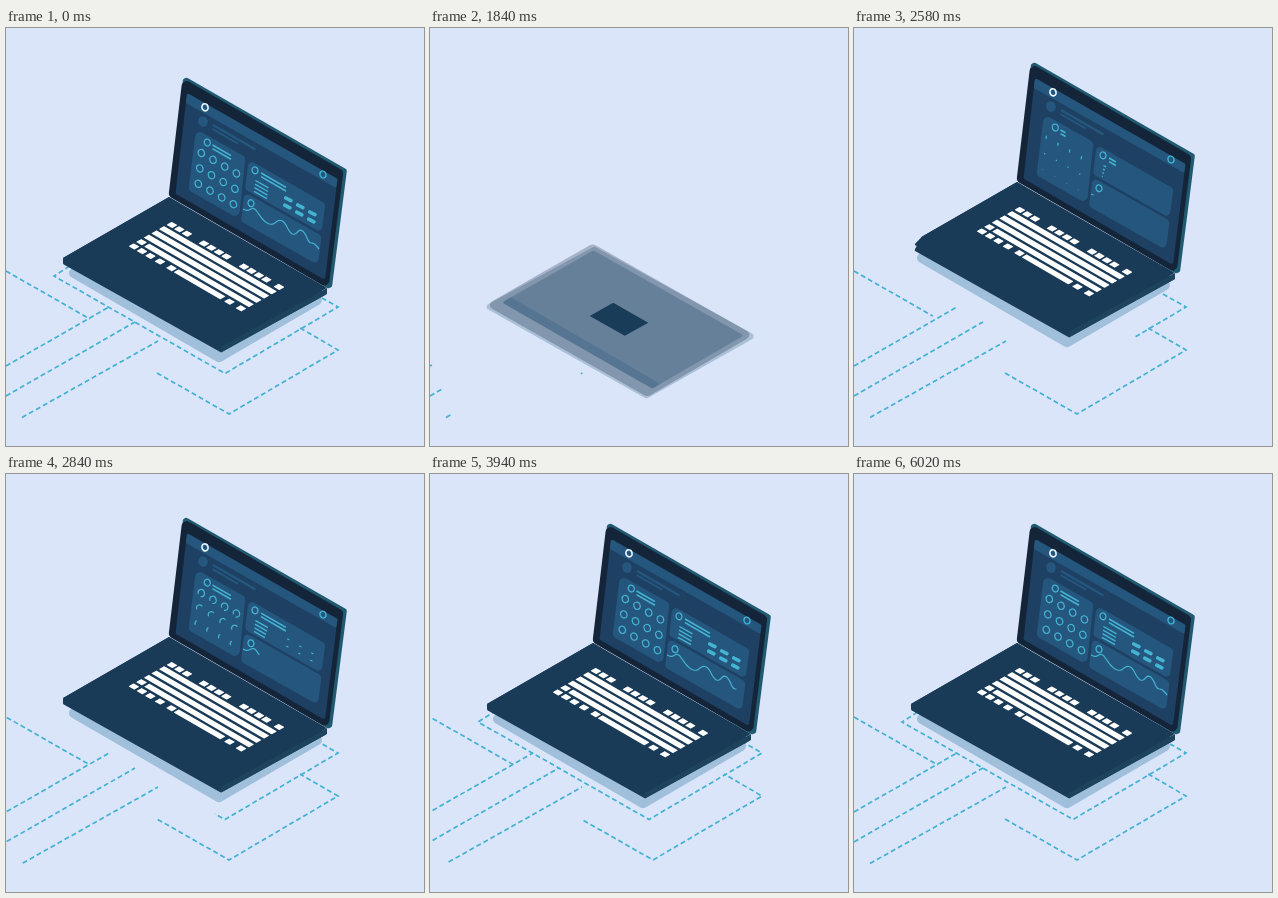
An HTML page with a canvas that plays this animation: 418x418 px, repeating every 6060 ms.

```html
<!DOCTYPE html>
<html lang="en">
<head>
<meta charset="utf-8">
<title>Laptop</title>
<style>
html, body { margin: 0; width: 100%; height: 100%; overflow: hidden; background: #dae5fa; }
canvas { display: block; width: 100vw; height: 100vh; }
</style>
</head>
<body>
<canvas id="stage"></canvas>
<script>
const SIZE = 418, LOOP = 6060;
const OUT_START = 1200, OUT_END = 1640, IN_START = 1660, IN_END = 4820;
const C = {
  back: '#dae5fa', line: '#42b1d2', cyan: '#45b4d3', shadow: '#9fbfdb',
  base: '#1a3b57', side: '#1d435d', bezel: '#14253a', edge: '#205a70',
  screen: '#1d4063', card: '#25567d'
};
const canvas = document.getElementById('stage');
const ctx = canvas.getContext('2d');

const part = (t, a, b) => Math.min(1, Math.max(0, (t - a) / (b - a)));
const smooth = p => (1 - Math.cos(Math.PI * p)) / 2;
const ease = (t, a, b) => smooth(part(t, a, b));
const mix = (a, b, p) => a + (b - a) * p;

function poly(points, fill, r = 0) {
  const n = points.length, [lx, ly] = points[n - 1], [fx, fy] = points[0];
  ctx.beginPath();
  ctx.moveTo((lx + fx) / 2, (ly + fy) / 2);
  points.forEach(([x, y], i) => {
    const [nx, ny] = points[(i + 1) % n];
    ctx.arcTo(x, y, nx, ny, r);
  });
  ctx.closePath();
  ctx.fillStyle = fill;
  ctx.fill();
}

function strokeStyle(color, width, cap = 'butt') {
  ctx.strokeStyle = color;
  ctx.lineWidth = width;
  ctx.lineCap = cap;
}

function seg(x1, y1, x2, y2, color, width, p = 1) {
  if (p <= 0) return;
  strokeStyle(color, width);
  ctx.beginPath();
  ctx.moveTo(x1, y1);
  ctx.lineTo(mix(x1, x2, p), mix(y1, y2, p));
  ctx.stroke();
}

function ring(x, y, r, color, width, p = 1) {
  if (p <= 0) return;
  strokeStyle(color, width);
  ctx.beginPath();
  ctx.ellipse(x, y, r * 0.92, r * 1.08, -0.3, Math.PI, Math.PI * (1 + 2 * p));
  ctx.stroke();
}

// Strokes the first share p of a polyline.
function trim(points, p) {
  if (p <= 0) return;
  const lens = points.slice(1).map(([x, y], i) => Math.hypot(x - points[i][0], y - points[i][1]));
  let left = p * lens.reduce((a, b) => a + b, 0);
  ctx.beginPath();
  ctx.moveTo(...points[0]);
  for (let i = 0; i < lens.length && left > 0; i++) {
    const k = Math.min(1, left / lens[i]);
    const [a, b] = [points[i], points[i + 1]];
    ctx.lineTo(mix(a[0], b[0], k), mix(a[1], b[1], k));
    left -= lens[i];
  }
  ctx.stroke();
}

const TRACES = [
  { from: 2060, to: 2680, pts: [[0, 243], [84, 291]] },
  { from: 1780, to: 2480, pts: [[0, 338], [103, 279]] },
  { from: 1750, to: 2180, pts: [[0, 368], [129, 294]] },
  { from: 1760, to: 2350, pts: [[16, 389.5], [152, 313]] },
  { from: 1800, to: 2600, pts: [[151, 345], [223, 386], [332, 322], [294, 300]] },
  { from: 2280, to: 3500, linear: true, pts: [[302, 262], [332, 279], [219, 345.5], [48, 248], [67, 236]] }
];

function drawTraces(t) {
  strokeStyle(C.line, 1.7);
  ctx.setLineDash([5, 3]);
  ctx.lineDashOffset = 16 * (1 - ease(t, 2500, IN_END));
  for (const { from, to, pts, linear } of TRACES) {
    const p = part(t, from, to);
    trim(pts, linear ? p : smooth(p));
  }
  ctx.setLineDash([]);
}

function drawBase(t) {
  const s = ease(t, IN_START, 2240);
  if (s <= 0) return;
  const thick = 6 * ease(t, 2240, 2560);
  const p = part(t, 2350, 2733), cut = 45 * p * (1 - p);

  ctx.globalAlpha = ease(t, 2400, 2560);
  poly([[163, 184], [58, 245], [213, 335], [321, 272]], C.shadow, 5);
  ctx.globalAlpha = 1;

  ctx.save();
  ctx.translate(189, 243);
  ctx.scale(s, s);
  ctx.translate(-189, -243);
  const top = [163, 169], right = [321, 260], front = [215, 318.5];
  const left = [57 + cut, 230 - cut * 0.577];
  const low = [57 + cut * 0.3, 230 + thick + cut * 0.15];
  if (thick > 0) {
    poly([top, left, low, [215, 318.5 + thick], [321, 260 + thick]], C.base, 1.5);
    poly([front, right, [321, 260 + thick], [215, 318.5 + thick]], C.side);
  }
  poly([top, left, [57 + cut * 0.3, 230 + cut * 0.15], front, right], C.base, 1);
  ctx.restore();
}

// Keyboard plane: u runs along a row, v across the rows.
const key = (u, v) => [166 + u - v, 197 + u * 0.578 + v * 0.565];
const plate = (u1, u2, v1, v2) => [key(u1, v1), key(u2, v1), key(u2, v2), key(u1, v2)];
const ROW = 7.6;
const ROWS = [
  [[0], [7.4], [15], [32], [39.4], [47], [54.4], [72], [79.4], [87], [94.4], [107]],
  [[0, 107]],
  [[0, 107]],
  [[0, 107]],
  [[0], [8, 107]],
  [[0], [8], [16.4], [26], [37.5], [45, 86], [95.5], [107]]
];

function drawKeys(t) {
  const across = part(t, 2000, 2234), down = part(t, 2060, 2300);
  if (across <= 0 || down <= 0) return;
  ctx.save();
  ctx.translate(0, 28 * (1 - ease(t, 2150, 2480)));
  const area = new Path2D();
  plate(-6, mix(-6, 115, across), -4, mix(-4, 42, down)).forEach(q => area.lineTo(...q));
  ctx.clip(area);
  ROWS.forEach((row, i) => {
    for (const [a, b = a] of row) {
      poly(plate(a - 2.9, b + 2.9, i * ROW - 2.6, i * ROW + 2.6), '#fff', 0.4);
    }
  });
  ctx.restore();
}

const WAVE = [[237, 181], [242, 183], [248, 179], [254, 188], [260, 195], [267, 197], [272, 192],
  [278, 193], [284, 205], [289, 207], [294, 201], [299, 205], [303, 215], [308, 215], [313, 221]];

// Samples the midpoint-smoothed curve through the wave points.
function wavePoints() {
  const out = [WAVE[0]];
  const mid = (a, b) => [(a[0] + b[0]) / 2, (a[1] + b[1]) / 2];
  for (let i = 1; i < WAVE.length - 1; i++) {
    const a = mid(WAVE[i - 1], WAVE[i]), b = mid(WAVE[i], WAVE[i + 1]);
    for (let k = 0; k <= 1; k += 0.2) {
      out.push([0, 1].map(j => mix(mix(a[j], WAVE[i][j], k), mix(WAVE[i][j], b[j], k), k)));
    }
  }
  out.push(WAVE[WAVE.length - 1]);
  return out;
}
const CURVE = wavePoints();

function drawCharts(t) {
  const head = ease(t, 2430, 2860);
  for (const dy of [0, 3.6]) {
    seg(206.5, 117 + dy, 225, 127.6 + dy, C.cyan, 1.6, head);
    seg(255, 145 + dy, 280, 159.4 + dy, C.cyan, 1.6, head);
  }
  for (let i = 0; i < 4; i++) {
    const x = 249.5 - i * 0.5, y = 152.5 + i * 3.6;
    seg(x, y, x + 13, y + 7.4, C.cyan, 1.4, ease(t, 2450 + i * 20, 2900 + i * 20));
  }

  const grow = [[2450, 2980], [2450, 3290], [2480, 3640]];
  grow.forEach(([from, to], r) => {
    const p = ease(t, from, to);
    for (let c = 0; c < 4; c++) ring(195.3 + c * 11.7 - r * 1.5, 125 + c * 6.8 + r * 15.4, 3.4, C.cyan, 1.2, p);
  });

  const pill = ease(t, 2640, 3200);
  if (pill > 0) {
    strokeStyle(C.cyan, 3.6 * pill, 'round');
    for (let r = 0; r < 2; r++) for (let c = 0; c < 3; c++) {
      const x = 282.3 + c * 12 - r, y = 171.3 + c * 7 + r * 7.2, w = 2.6 * pill;
      ctx.beginPath();
      ctx.moveTo(x - w, y - w * 0.5);
      ctx.lineTo(x + w, y + w * 0.5);
      ctx.stroke();
    }
  }
  strokeStyle(C.cyan, 1.2);
  trim(CURVE, part(t, 2540, 4080));
}

function drawLid(t) {
  const open = ease(t, 1820, 2170);
  if (open <= 0) return;
  ctx.save();
  // Swing the panel about its hinge line.
  const dx = mix(-106, 13, open) - 13, dy = mix(61, -115, open) + 115, det = 19468;
  ctx.translate(163, 168);
  ctx.transform(1 + dx * 91 / det, dy * 91 / det, -dx * 159 / det, 1 - dy * 159 / det, 0, 0);
  ctx.translate(-163, -168);
  ctx.globalAlpha = part(t, 1820, 1900);

  const depth = mix(2.5, 4.5, ease(t, 2180, 2420));
  poly([[177, 51], [180.5, 49.5], [336.5 + depth, 141.5], [326, 259], [322, 260.5], [166, 168]], C.edge, 2.5);
  poly([[176.5, 50], [337.5, 143], [322.5, 260.5], [162.5, 168]], C.bezel, 5);
  poly([[181, 65], [331.5, 151], [319, 252], [169.5, 165.5]], C.screen, 2);
  poly([[181, 65], [331.5, 151], [330.3, 160], [179.8, 75]], C.card, 1.5);

  ctx.globalAlpha *= ease(t, 1940, 2140);
  ctx.fillStyle = C.card;
  ctx.beginPath();
  ctx.ellipse(197, 93.5, 4.8, 5.4, -0.3, 0, Math.PI * 2);
  ctx.fill();
  seg(207, 97, 249.5, 121.5, C.card, 2.4);
  seg(206.5, 101, 232, 115.7, C.card, 2);
  poly([[190, 101], [239.5, 129], [233, 191], [182.5, 162]], C.card, 5);
  poly([[242.5, 131.5], [319.5, 175.5], [315.5, 205], [239, 161.5]], C.card, 4);
  poly([[238.5, 164], [315.5, 207.5], [312, 237], [235, 193.5]], C.card, 4);
  ring(199, 79.3, 3.3, '#e9f4fc', 1.7);
  ring(317, 146.5, 3.2, C.cyan, 1.3);
  ring(201.3, 114.5, 3.2, C.cyan, 1.3);
  ring(249, 142.3, 3.2, C.cyan, 1.3);
  ring(245, 175.2, 3.2, C.cyan, 1.3);
  drawCharts(t);
  ctx.restore();
}

function lift(t) {
  return t < 2580 ? mix(48, -15, ease(t, 1900, 2580)) : mix(-15, 0, ease(t, 2580, 3040));
}

function render(t) {
  let time = t, leaving = false;
  if (t < OUT_START) time = IN_END;
  else if (t < IN_START) {
    leaving = true;
    time = mix(IN_END, IN_START, Math.sqrt(part(t, OUT_START, OUT_END)));
  }
  ctx.setTransform(canvas.width / SIZE, 0, 0, canvas.height / SIZE, 0, 0);
  ctx.fillStyle = C.back;
  ctx.fillRect(0, 0, SIZE, SIZE);
  drawTraces(time);
  ctx.save();
  ctx.translate(0, leaving ? Math.max(0, lift(time)) : lift(time));
  drawBase(time);
  drawKeys(time);
  drawLid(time);
  ctx.restore();
}

function resize() {
  const dpr = window.devicePixelRatio || 1;
  canvas.width = Math.round(innerWidth * dpr);
  canvas.height = Math.round(innerHeight * dpr);
}

const start = performance.now();
function frame() {
  render((performance.now() - start) % LOOP);
  requestAnimationFrame(frame);
}
addEventListener('resize', resize);
resize();
frame();
</script>
</body>
</html>
```
